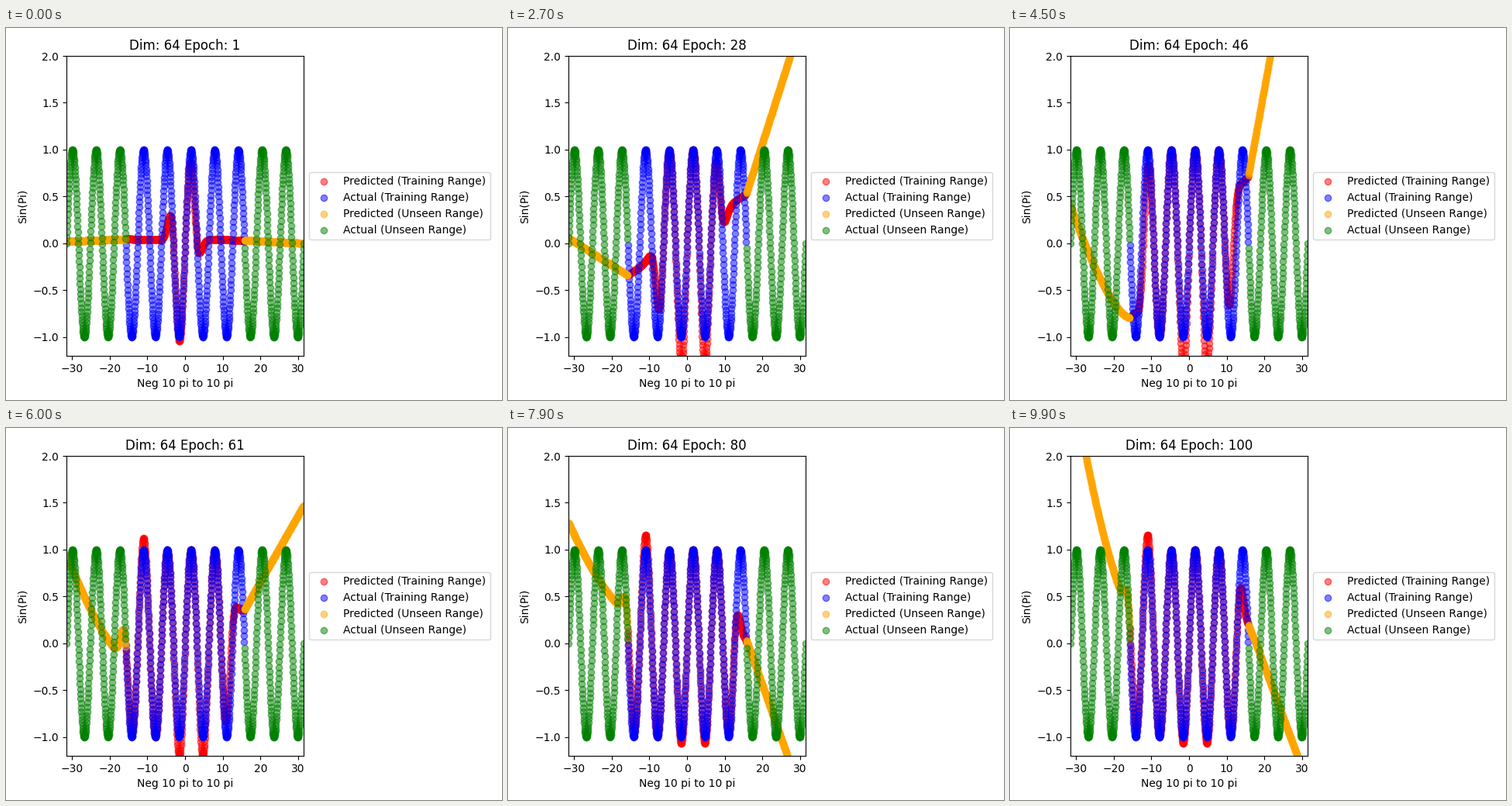
Animation, 640 px wide and 480 px high, one loop 10000 ms. Source, as a matplotlib script:

```python
import numpy as np
import matplotlib.pyplot as plt
from matplotlib.animation import FuncAnimation

EPOCHS = 100
W, H = 640, 480
EDGE = 10 * np.pi
x = np.linspace(-EDGE, EDGE, 1000)
seen = np.abs(x) < EDGE / 2
actual = np.sin(x)

# Height of the extrapolated tails at -10 pi, -5 pi, 5 pi and 10 pi
MARKS = [1, 19, 36, 46, 61, 80, 100]
LEFT_TIP = [.02, -.43, .49, .40, .95, 1.29, 2.9]
LEFT_EDGE = [.045, -.15, -.51, -.80, -.14, .36, .42]
RIGHT_EDGE = [.035, .38, .67, .72, .36, .04, .22]
RIGHT_TIP = [0, .86, 4, 4.2, 1.47, -1.75, -1.5]


def sigmoid(v):
    return 1 / (1 + np.exp(-v / 0.7))


def tails(epoch):
    """Straight line across the training range with a free tail on each side."""
    tip_l, edge_l, edge_r, tip_r = (
        np.interp(epoch, MARKS, v)
        for v in (LEFT_TIP, LEFT_EDGE, RIGHT_EDGE, RIGHT_TIP))
    bend = np.interp(epoch, [36, 46], [1, 1.5])
    u = np.clip(2 * np.abs(x) / EDGE - 1, 0, 1)
    mid = np.interp(x, [-EDGE / 2, EDGE / 2], [edge_l, edge_r])
    return mid + np.where(x < 0, (tip_l - edge_l) * u ** bend,
                          (tip_r - edge_r) * u)


def predict(epoch):
    """The sine is learned from the centre outwards, with some overshoot."""
    lo = np.interp(epoch, [1, 19, 61], [-3.6, -6, -16])
    hi = np.interp(epoch, [1, 19, 36, 100], [2.8, 6.1, 11.2, 13.8])
    dip = np.interp(epoch, [1, 36, 46, 75], [.12, .4, .4, .08])
    crest = np.interp(epoch, [48, 65], [0, .16])
    wave = actual * (1 + dip * (actual < 0) * np.exp(-((x - np.pi / 2) / 5) ** 4))
    wave = wave + crest * np.exp(-(x + 3.5 * np.pi) ** 2)
    learned = sigmoid(x - lo) * sigmoid(hi - x)
    base = tails(epoch)
    return base + learned * (wave - base)


fig, ax = plt.subplots(figsize=(W / 100, H / 100), dpi=100)
fig.subplots_adjust(left=78 / W, right=384 / W, top=1 - 36 / H, bottom=1 - 423 / H)


def dots(y, mask, color, label):
    return ax.scatter(x[mask], y[mask], color=color, alpha=0.5, label=label)


guess = predict(1)
red = dots(guess, seen, "red", "Predicted (Training Range)")
dots(actual, seen, "blue", "Actual (Training Range)")
orange = dots(guess, ~seen, "orange", "Predicted (Unseen Range)")
dots(actual, ~seen, "green", "Actual (Unseen Range)")

ax.set_xlim(-EDGE, EDGE)
ax.set_ylim(-1.2, 2)
ax.set_xlabel("Neg 10 pi to 10 pi")
ax.set_ylabel("Sin(Pi)")
title = ax.set_title("Dim: 64 Epoch: 1")
ax.legend(loc="center left", bbox_to_anchor=(1, 0.5))


def update(frame):
    epoch = frame + 1
    y = predict(epoch)
    red.set_offsets(np.column_stack([x[seen], y[seen]]))
    orange.set_offsets(np.column_stack([x[~seen], y[~seen]]))
    title.set_text(f"Dim: 64 Epoch: {epoch}")
    return red, orange, title


anim = FuncAnimation(fig, update, frames=EPOCHS, interval=100,
                     repeat=True, repeat_delay=0)
plt.show()
```
